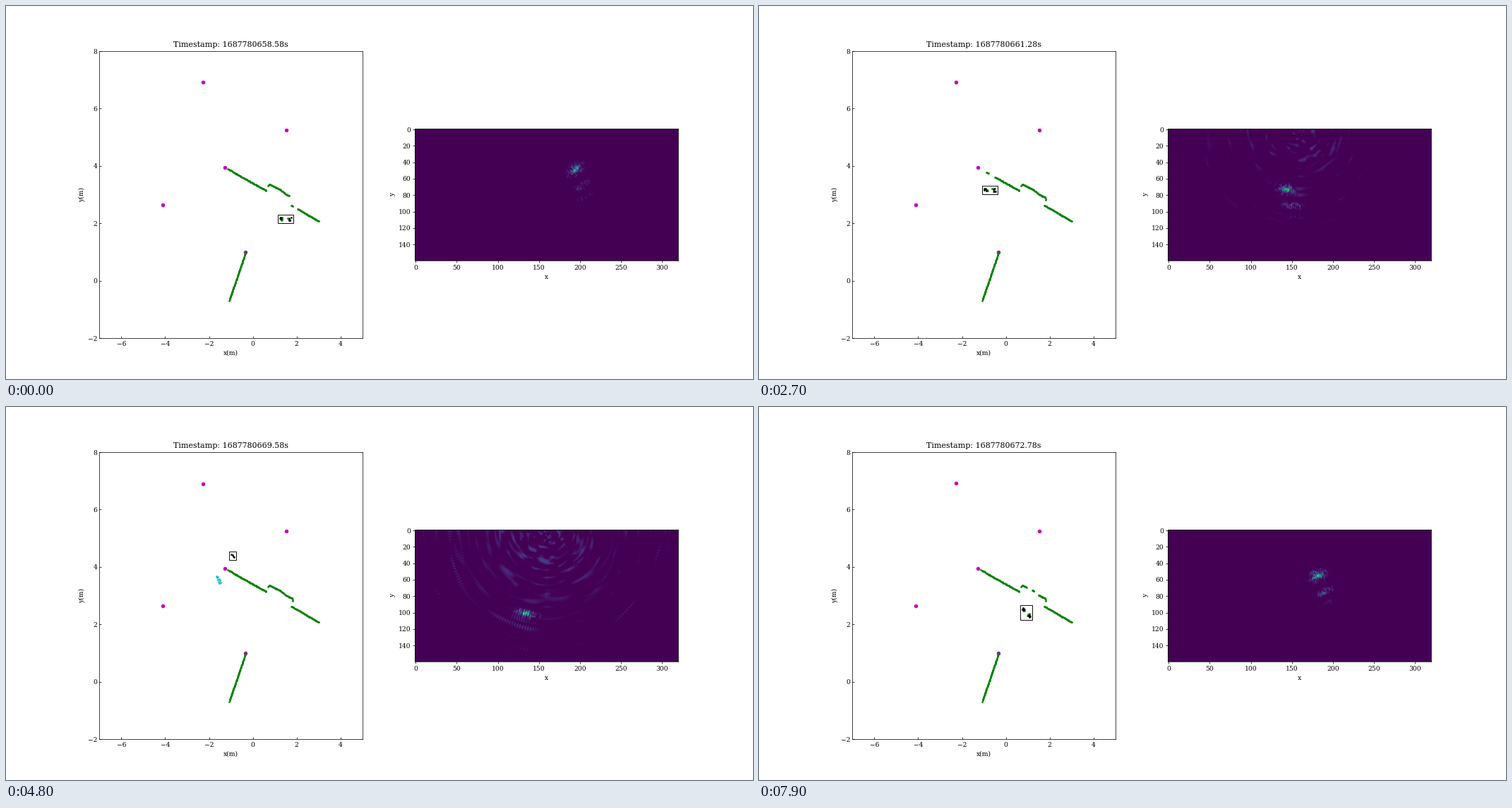
Write a matplotlib script that moves like this. It is 1058x529 px and loops after 8 s.

```python
import numpy as np
import matplotlib.pyplot as plt
from matplotlib.animation import FuncAnimation
from matplotlib.patches import Rectangle

FRAMES, STEP = 80, 100
CUT = 40
LOST = range(CUT, CUT + 6)    # right after the skip nothing is boxed
STRIDE = 5.37                 # frames per step of the walk
SHADE = -18.2                 # bearing beyond which the near wall hides all
W, H, SCALE = 320, 160, 23.5  # radar cells and cells per metre

plt.rcParams["font.family"] = "DejaVu Serif"

WALLS = [
    [(-1.13, 3.89), (0.605, 3.14)],
    [(0.67, 3.32), (0.76, 3.36), (1.23, 3.18), (1.55, 3.00), (1.79, 2.91),
     (1.82, 2.83)],
    [(1.76, 2.63), (2.99, 2.08)],
    [(-0.33, 1.00), (-1.07, -0.67)]]


def walker(i):
    """Walk out and back along one straight line."""
    x = 1.48 - 0.0815 * i if i < CUT else 0.93 - 0.0805 * (FRAMES - 1 - i)
    return np.array([x, 2.84 - 0.46 * x])


def legs(i, reach=1.0):
    if i < CUT:
        stride, phase = np.array([0.21, -0.01]), i
    else:
        stride, phase = np.array([0.14, -0.13]), i - FRAMES + 1
    swing = 0.25 + 0.75 * abs(np.cos(np.pi * phase / STRIDE))
    return walker(i) + np.outer([-1, 1], stride) * swing * reach


def bearing(p):
    return np.degrees(np.arctan2(p[..., 0], p[..., 1]))


def hidden(i):
    return bearing(walker(i)) < SHADE


def echo(i):
    """Place of the radar echo; a hidden walker shows up as a reflection."""
    return walker(i) + ((0.5, 0.75) if hidden(i) else (0, -0.07))


def clutter(i):
    if i < CUT:
        return 0.75 * (i / 36) ** 2
    return np.clip((55 - i) / 12.5, 0, 1)


def sample(line, gap=0.028):
    pts = []
    for a, b in zip(line[:-1], line[1:]):
        a, b = np.array(a), np.array(b)
        n = max(2, int(np.hypot(*(b - a)) / gap))
        pts.append(a + (b - a) * np.linspace(0, 1, n)[:, None])
    return np.vstack(pts)


wall_pts = np.vstack([sample(w) for w in WALLS])
wall_pts += np.random.default_rng(4).normal(0, 0.004, wall_pts.shape)
wall_dir = bearing(wall_pts)
near = wall_pts[:, 1] < 1.1

# radar grid in polar form around the top centre
gy, gx = np.mgrid[0:H, 0:W].astype(float)
rad = np.hypot(gx - 160, gy)
ang = np.arctan2(gx - 160, gy + 1e-6)
dash = 0.5 + 0.5 * np.cos(ang * 230)
ring_dash = 1 - 0.8 * np.clip((rad - 45) / 40, 0, 1) * (1 - dash)
ring_env = (1 - 0.3 * rad / 160) * (rad < 159)


def polar_noise(rng, n_r, n_a):
    """Smooth random field, bilinear in range and angle."""
    g = rng.random((n_r + 2, n_a + 2))
    u = np.clip(rad / 180, 0, 0.9999) * n_r
    v = (ang / np.pi + 0.5) * (n_a - 0.001)
    a, b = u.astype(int), v.astype(int)
    u, v = u - a, v - b
    return ((1 - u) * ((1 - v) * g[a, b] + v * g[a, b + 1])
            + u * ((1 - v) * g[a + 1, b] + v * g[a + 1, b + 1]))


still = polar_noise(np.random.default_rng(11), 60, 12)


def spot(x, y, s_rad, s_arc):
    r0, a0 = np.hypot(x - 160, y), np.arctan2(x - 160, y)
    return np.exp(-((rad - r0) / s_rad) ** 2 - ((ang - a0) * r0 / s_arc) ** 2)


def radar(i):
    rng = np.random.default_rng(500 + i)
    x, y = echo(i) * SCALE + (160, 0)
    level = clutter(i)
    field = 0.55 * still + 0.45 * polar_noise(rng, 75, 18)
    rings = np.clip(field * ring_env - (0.8 - 0.62 * level), 0, 1)
    img = 0.5 * rings * ring_dash

    grain = polar_noise(rng, 95, 170) ** 2 * (0.3 + 0.7 * dash)
    far = hidden(i)
    img += 1.1 * grain * spot(x, y, *((4.5, 13) if far else (6, 10)))
    img += 0.55 * (0.3 + 0.7 * dash) * spot(x, y, 2, 4)
    if not far:
        img += 0.6 * grain * spot(x + 8, y + 20, 4, 11)
        img += 0.15 * grain * spot(x + 12, y + 33, 4, 16)
    img = np.clip(img - 0.02, 0, None)
    return img / img.max()


fig, (ax, rx) = plt.subplots(1, 2, figsize=(16, 8), dpi=66.125)
fig.subplots_adjust(top=0.879, bottom=0.109)
ax.set(xlim=(-7, 5), ylim=(-2, 8), xlabel="x(m)", ylabel="y(m)",
       xticks=range(-6, 5, 2), yticks=range(-2, 9, 2))
ax.tick_params(direction="in")
title = ax.set_title("")


def dots(color, marker=".", size=4.6):
    return ax.plot([], [], color + marker, ms=size, mew=0.6)[0]


posts, green, cyan, black = dots("m", "o", 5.4), dots("g"), dots("c"), dots("k")
box = ax.add_patch(Rectangle((0, 0), 0, 0, fill=False, ec="k", lw=1))

image = rx.imshow(np.zeros((H, W)), cmap="viridis", vmin=0, vmax=1)
rx.set(xlabel="x", ylabel="y", xticks=range(0, 301, 50),
       yticks=range(0, 141, 20))


def cluster(rng, centers, n, size):
    return np.vstack([c + rng.uniform(-size, size, (n, 2)) for c in centers])


def streak(center, step, n, width):
    """Points along a short line, alternating to both sides of it."""
    t = np.linspace(-1, 1, n)[:, None]
    side = np.where(np.arange(n) % 2, 1, -1)[:, None]
    return center + t * step + side * np.array([width, 0])


def lidar(i, rng):
    feet = legs(i, 0.75)
    seen = feet[bearing(feet) > SHADE]
    show = np.ones(len(wall_pts), bool)
    for b in bearing(seen):
        show &= near | (abs(wall_dir - b) > 2.0)
    body = [cluster(rng, seen, 5, 0.055)] if len(seen) else []
    return np.vstack([wall_pts[show]] + body)


def draw(i):
    rng = np.random.default_rng(90 + i)
    stamp = 1687780658.58 + 0.1 * i + 6.2 * (i >= CUT) + 0.1 * (i >= 50)
    title.set_text(f"Timestamp: {stamp:.2f}s")

    shift = 0.02 if i % 13 < 2 else 0
    posts.set_data([-2.27, 1.52, -1.29, -4.10 - shift, -0.33],
                   [6.89 + shift, 5.25, 3.955, 2.655, 1.01])
    green.set_data(*lidar(i, rng).T)

    ghost = hidden(i) and i not in LOST
    if ghost:
        pts = streak(echo(i) + (0.15, 0.08), (0.06, -0.05), 4, 0.008)
        cyan.set_data(*streak(walker(i), (0.07, -0.13), 9, 0.035).T)
    else:
        pts = cluster(rng, legs(i), 4, 0.05)
        cyan.set_data([], [])
    black.set_data(*pts.T)

    lo, hi = pts.min(axis=0) - 0.1, pts.max(axis=0) + 0.1
    box.set_bounds(*lo, *(hi - lo))
    box.set_visible(i not in LOST)
    image.set_data(radar(i))
    return title, posts, green, cyan, black, box, image


anim = FuncAnimation(fig, draw, frames=FRAMES, interval=STEP, repeat=True,
                     repeat_delay=0, blit=False)
plt.show()
```
